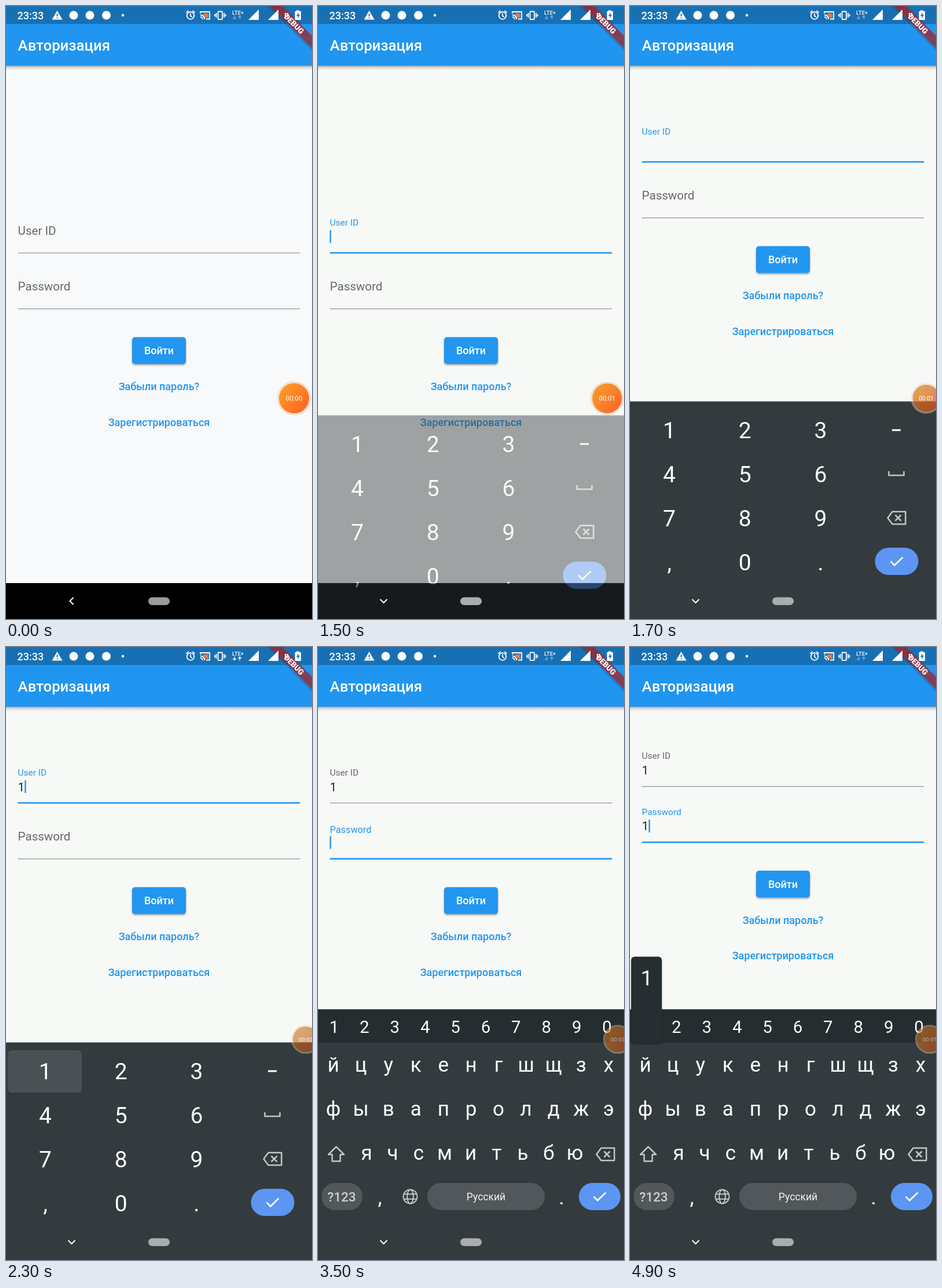
Recreate the animation shown at these times as an HTML page. Size 529 by 1058 pixels, loop 5 s.

```html
<!DOCTYPE html>
<html lang="ru">
<head>
<meta charset="utf-8">
<title>Авторизация</title>
<style>
html, body { margin: 0; width: 100%; height: 100%; overflow: hidden; background: #000; }
svg { display: block; width: 100%; height: 100%; font-family: Roboto, "Noto Sans", sans-serif; }
.mid { text-anchor: middle; }
.med { font-weight: 500; }
.link { font-size: 18px; font-weight: 500; fill: #2096f0; text-anchor: middle; }
.line { fill: none; stroke: #fff; }
.soft { fill: none; stroke: #c3c6c7; stroke-width: 2.5; }
</style>
</head>
<body>
<svg viewBox="0 0 529 1058">
  <defs>
    <linearGradient id="shade" x1="0" y1="0" x2="0" y2="1">
      <stop offset="0" stop-color="#000" stop-opacity=".34"/>
      <stop offset=".4" stop-color="#000" stop-opacity=".12"/>
      <stop offset="1" stop-color="#000" stop-opacity="0"/>
    </linearGradient>
    <linearGradient id="orange" x1="0" y1="0" x2="1" y2="1">
      <stop offset=".1" stop-color="#ff9d25"/>
      <stop offset=".9" stop-color="#ff6425"/>
    </linearGradient>
    <filter id="lift" x="-20%" y="-30%" width="140%" height="170%">
      <feDropShadow dx="0" dy="2" stdDeviation="1.6" flood-opacity=".38"/>
    </filter>
    <g id="erase">
      <path class="soft" stroke-linejoin="round" d="M-15.500 0L-7.500-10.800H15.300V10.800H-7.500Z"/>
      <path class="soft" d="M-2.500-5l10 10m0-10l-10 10"/>
    </g>
    <path id="check" class="line" stroke-width="2.6" d="M-10.500 0l6.800 6.800L10.500-7"/>
    <path id="bars" fill="#fff" d="M0 0V-18L-18 0Z"/>
  </defs>

  <rect id="page" width="529" height="1058"/>
  <g id="form">
    <g id="fields"></g>
    <rect x="218" y="571.500" width="93" height="46.300" rx="5" fill="#2096f0" filter="url(#lift)"/>
    <text class="link" x="264.500" y="601.300" style="fill:#fff">Войти</text>
    <text class="link" x="264.500" y="663">Забыли пароль?</text>
    <text class="link" x="264.500" y="724.800">Зарегистрироваться</text>
  </g>

  <rect width="529" height="103" fill="#2096f0"/>
  <rect width="529" height="31" fill="#1870b4"/>
  <rect y="103" width="529" height="8" fill="url(#shade)"/>
  <text class="med" x="20.600" y="77" font-size="25.700" fill="#fff">Авторизация</text>

  <g transform="translate(529 0) rotate(45)">
    <rect x="-60" y="36" width="120" height="15.400" fill="#b71c1c" fill-opacity=".63" filter="url(#lift)"/>
    <text class="mid" y="48.400" font-size="13.100" font-weight="900" fill="#fff">DEBUG</text>
  </g>

  <g id="status" fill="#fff">
    <text class="med" x="19.500" y="22.500" font-size="18">23:33</text>
    <path d="M88.500 8l9 15.500h-18Z"/>
    <path d="M88.500 13v5m0 1.500v2" stroke="#1870b4" stroke-width="1.800"/>
    <circle cx="117" cy="16" r="7.500"/>
    <circle cx="145" cy="16" r="7.500"/>
    <circle cx="173.500" cy="16" r="7.500"/>
    <circle cx="202" cy="16" r="2.300"/>
    <g class="line" stroke-width="1.800">
      <circle cx="319" cy="16.500" r="6.300"/>
      <path d="M319 12.500v4.500l3 2M311.500 11.500l4-3.500m7 0l4 3.500"/>
      <path d="M336 13V10H352V22.500H346M336 15.500a7.500 7.500 0 0 1 7.500 7.500M336 19a4 4 0 0 1 4 4"/>
      <rect x="366.500" y="9.500" width="7.500" height="13.500" rx="1"/>
      <path d="M363.500 12v8m-2.500-6v4M377 12v8m2.500-6v4"/>
    </g>
    <path d="M341 12.500h8.500V20H345l-4-4Z" fill="#f0753a"/>
    <text class="med" x="391" y="14.500" font-size="9.200">LTE+</text>
    <path id="data" class="line" stroke-width="1.500" d="M395 16.500v6m-2.500-2.500l2.500 2.500 2.500-2.500M404 23v-6m-2.500 2.500l2.500-2.500 2.500 2.500"/>
    <use href="#bars" x="437" y="24"/>
    <use href="#bars" x="471" y="24"/>
    <text class="mid" x="485" y="21" font-size="12" font-weight="700">R</text>
    <path d="M502 9V7.500h5V9h3V24H499.500V9Z"/>
    <path d="M505.500 11l-3.500 6h2.500v4.500l3.500-6.500h-2.500Z" fill="#1870b4"/>
  </g>

  <rect y="996" width="529" height="62" fill="#000"/>
  <g id="numpad">
    <rect y="682.500" width="529" height="376" fill="#333b3e"/>
    <rect id="press" x="3" y="696" width="128" height="73" rx="6" fill="#495155"/>
    <g id="digits" class="mid" fill="#fff" font-size="39"></g>
    <rect x="453" y="730.500" width="15" height="3" fill="#fff"/>
    <path class="soft" d="M447.500 803v7h26v-7"/>
    <use href="#erase" x="461" y="883.500"/>
    <rect x="423.500" y="935" width="75" height="47" rx="23.500" fill="#5c96f2"/>
    <use href="#check" x="461" y="958.500"/>
  </g>
  <g id="letters">
    <rect y="625.500" width="529" height="433" fill="#333b3e"/>
    <rect y="625.500" width="529" height="57.500" fill="#262d30"/>
    <g id="keys" class="mid" fill="#fff"></g>
    <path class="soft" stroke-linejoin="round" d="M31.500 862.500l13.500 13.500h-6.500v11.500h-14V876H18Z"/>
    <use href="#erase" x="497" y="875.500"/>
    <rect x="6" y="925" width="71" height="47" rx="23.500" fill="#51575a"/>
    <text class="mid med" x="41" y="956.500" font-size="22.500" fill="#cdd0d1">?123</text>
    <g class="soft" transform="translate(159.500 948.500)" style="stroke-width:2">
      <circle r="12"/>
      <ellipse rx="5.300" ry="12"/>
      <path d="M-11-4.300H11M-11 4.300H11"/>
    </g>
    <rect x="189" y="925" width="203" height="47" rx="23.500" fill="#51575a"/>
    <text class="mid" x="290.500" y="954.500" font-size="17.500" fill="#f2f3f3">Русский</text>
    <rect x="451" y="925" width="72" height="47" rx="23.500" fill="#5c96f2"/>
    <use href="#check" x="487" y="948.500"/>
    <g id="popup">
      <rect x="2" y="534.500" width="53" height="149" rx="6" fill="#262d30" filter="url(#lift)"/>
      <text class="mid" x="29" y="584" font-size="37" fill="#fff">1</text>
    </g>
  </g>

  <path id="back" class="line" stroke-width="2"/>
  <rect id="home" x="246" y="1020.500" width="37" height="13.500" rx="6.750"/>

  <g id="timer">
    <circle r="29.500" fill="#f0d3ba" fill-opacity=".65"/>
    <circle r="26" fill="url(#orange)"/>
    <circle id="dim" r="26"/>
    <text id="clock" class="mid" y="4.200" font-size="11.500" fill="#fff"></text>
  </g>
</svg>
<script>
const LOOP = 5000, STEP = 100;
const BLUE = '#2096f0', GREY = '#666867';
const $ = id => document.getElementById(id);
const within = (t, spans) => spans.some(([a, b]) => t >= a && t < b);
const clamp = v => Math.min(1, Math.max(0, v));
const mix = (a, b, p) => a + (b - a) * p;
const show = (el, on) => el.setAttribute('display', on ? 'inline' : 'none');
const set = (el, attrs) => { for (const k in attrs) el.setAttribute(k, attrs[k]); };

function add(parent, tag, attrs, text = '') {
  const el = document.createElementNS('http://www.w3.org/2000/svg', tag);
  set(el, attrs);
  el.textContent = text;
  return parent.appendChild(el);
}

function keyRow(parent, chars, x, gap, y, size) {
  [...chars].forEach((c, i) => add(parent, 'text', { x: x + gap * i, y, 'font-size': size }, c));
}

['123', '456', '789', ',0.'].forEach((row, i) => keyRow($('digits'), row, 68, 130.7, 746 + 76 * i, 39));
keyRow($('keys'), '1234567890', 28, 52.4, 665.5, 29.5);
keyRow($('keys'), 'йцукенгшщзх', 26.5, 47.6, 732.5, 35);
keyRow($('keys'), 'фывапролджэ', 26.5, 47.6, 808.5, 35);
keyRow($('keys'), 'ячсмитьбю', 84, 45, 884.5, 35);
keyRow($('keys'), ',.', 107, 314, 961.5, 35);

function makeField(name, dy, focus, blur, typed, blink) {
  const g = add($('fields'), 'g', { transform: `translate(0 ${dy})` });
  const label = add(g, 'text', { 'font-size': 20.57 }, name);
  const line = add(g, 'rect', { x: 20.6, width: 487.8 });
  const value = add(g, 'text', { x: 20.6, y: 405.5, 'font-size': 20.57, fill: '#212222' }, '1');
  const caret = add(g, 'rect', { y: 387, width: 2.4, height: 22, fill: BLUE });
  return t => {
    const p = clamp((t - focus) / 167);
    const rise = 1 - (1 - p) ** 2;
    const active = t > focus && t < blur;
    set(label, {
      transform: `translate(20.6 ${mix(395, 378.7, rise)}) scale(${mix(1, .75, rise)})`,
      fill: active ? BLUE : GREY
    });
    set(line, {
      y: active ? 424.8 : 425.6,
      height: active ? 2.6 : 1.3,
      fill: active ? BLUE : '#979998'
    });
    show(value, t >= typed);
    caret.setAttribute('x', t >= typed ? 32.3 : 20.3);
    show(caret, within(t, blink));
  };
}

const fields = [
  makeField('User ID', 0, 1100, 3400, 2300, [[1100, 1600], [2100, 2800]]),
  makeField('Password', 96.4, 3400, LOOP, 4800, [[3400, 3900], [4400, LOOP]])
];

const ticks = [1000, 2100, 3100, 4200, 4900];
const traffic = [[1000, 1500], [2100, 2400], [3700, 3900], [4200, 4500]];
// time, opacity, drop
const slideIn = [[1500, .45, 24], [1600, .88, 7], [1700, 1, 0]];

function draw(t) {
  $('page').setAttribute('fill', t < 100 ? '#f7f9fb' : '#f7f9f7');
  fields.forEach(f => f(t));
  const lift = t < 1700 ? 0 : t < 3600 ? -157 : -185.5;
  $('form').setAttribute('transform', `translate(0 ${lift})`);
  $('data').setAttribute('opacity', within(t, traffic) ? 1 : .4);

  const open = t >= 1500;
  const [, opacity, drop] = slideIn.filter(s => t >= s[0]).pop() || slideIn[0];
  show($('numpad'), open && t < 3500);
  set($('numpad'), { opacity, transform: `translate(0 ${drop})` });
  show($('press'), within(t, [[2100, 2400]]));
  show($('letters'), t >= 3500);
  show($('popup'), t >= 4700);
  set($('back'), {
    d: open ? 'M107.500 1024l6 6 6-6' : 'M116.500 1021l-6 6 6 6',
    stroke: open ? '#a9acad' : '#8c8c8c'
  });
  $('home').setAttribute('fill', open ? '#abadad' : '#9b9b9b');

  const p = clamp((t - 1470) / 330);
  set($('timer'), {
    transform: `translate(${mix(498, 518, p)} 677) scale(${mix(1, .85, p)})`,
    opacity: mix(1, .62, p)
  });
  $('dim').setAttribute('opacity', .22 * p);
  $('clock').textContent = '00:0' + ticks.filter(k => t >= k).length;
}

const start = performance.now();
function frame() {
  const t = (performance.now() - start) % LOOP;
  draw(Math.floor(t / STEP) * STEP);
  requestAnimationFrame(frame);
}
frame();
</script>
</body>
</html>
```
